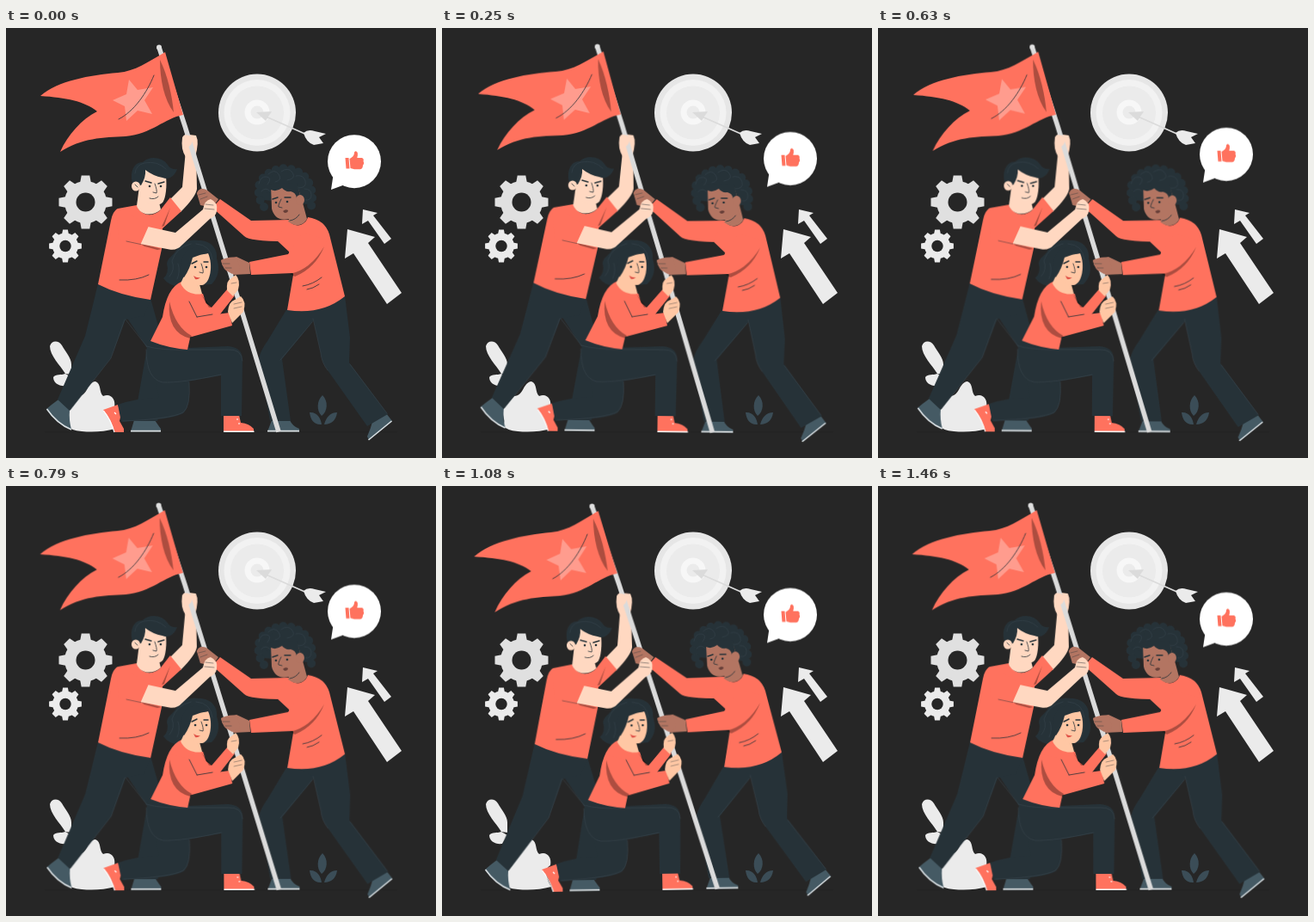
Animation of 500x500 px, one loop 1500 ms. Source, as an HTML page without scripts:

```html
<!DOCTYPE html>
<html lang="en">
<head>
<meta charset="utf-8">
<title>Raising the flag</title>
<style>
  html, body { margin: 0; width: 100%; height: 100%; overflow: hidden; background: #262626; }
  svg { display: block; width: 100vw; height: 100vh; }

  .coral { fill: #ff725e; }
  .dark { fill: #263238; }
  .pale { fill: #ebebeb; }
  .white { fill: #fff; }
  .peach { fill: #ffd8c1; }
  .tan { fill: #ffc7a4; }
  .brown { fill: #b37562; }
  .shoe { fill: #455a64; }
  .shade { fill: #000; opacity: .32; }
  .line, .seam, .curl { fill: none; stroke-linecap: round; stroke-linejoin: round; }
  .line { stroke: #263238; stroke-width: .8; }
  .brow { stroke-width: 1.4; }
  .seam { stroke: #3c4950; stroke-width: .5; }
  .curl { stroke: #36444c; stroke-width: .6; }

  /* both motions are linear, stepped at 24 pictures per second */
  .team { transform-origin: 246px 250px; animation: sway 1.5s -4ms infinite; }
  .bubble { animation: float 1.5s -4ms infinite; }

  @keyframes sway {
    0% { transform: rotate(0deg); animation-timing-function: steps(9); }
    25% { transform: rotate(1deg); animation-timing-function: steps(18); }
    75% { transform: rotate(-1deg); animation-timing-function: steps(9); }
    100% { transform: rotate(0deg); }
  }
  @keyframes float {
    0%, 100% { transform: translateY(0); animation-timing-function: steps(18); }
    50% { transform: translateY(-10px); animation-timing-function: steps(18); }
  }
</style>
</head>
<body>
<svg viewBox="0 0 500 500">
  <defs>
    <path id="tooth" d="M-6.500-22-4.800-31H4.800L6.500-22Z"/>
    <g id="teeth">
      <use href="#tooth"/>
      <use href="#tooth" transform="rotate(90)"/>
      <use href="#tooth" transform="rotate(180)"/>
      <use href="#tooth" transform="rotate(270)"/>
    </g>
    <g id="gear">
      <use href="#teeth"/>
      <use href="#teeth" transform="rotate(45)"/>
      <circle r="24.500"/>
      <circle r="11" fill="#262626"/>
    </g>
  </defs>

  <rect width="500" height="500" fill="#262626"/>
  <path d="M45 469.700H455" stroke="#232323" stroke-width=".7"/>

  <g id="scenery">
    <use href="#gear" x="92.500" y="202.500" fill="#e0e0e0"/>
    <use href="#gear" transform="translate(69 253.500) scale(.61)" fill="#ebebeb"/>

    <g id="board">
      <circle cx="292" cy="98.500" r="45" fill="#e6e6e6"/>
      <circle cx="292" cy="98.500" r="38.500" fill="#f2f2f2"/>
      <circle cx="292" cy="98.500" r="31" class="pale"/>
      <circle cx="292" cy="98" r="14.500" fill="#f7f7f7"/>
      <circle cx="292" cy="98" r="7.500" class="pale"/>
      <path d="M300 102 352 125" stroke="#dbdbdb" stroke-width="1.800"/>
      <path d="M291 98 309 97 302 108Z" fill="#dbdbdb"/>
      <path d="M346 122Q351 117 359 120L372 123 364 127 369 134 358 136Q349 133 346 122Z" class="pale"/>
    </g>

    <path class="pale" d="M397 234 429 243 421 250 460 308 443 321 404 262 394 268Z"/>
    <path class="pale" d="M415 211 432 215 427 218 448 245 440 251 421 224 414 228Z"/>

    <g class="pale">
      <path d="M51 370C53 363 61 363 65 369C69 376 76 384 76 391V403L69 402C63 392 51 381 51 370Z"/>
      <path d="M55 406C58 402 64 404 69 402L76 406 70 416C62 417 55 413 55 406Z"/>
      <path d="M71 462C75 455 68 450 72 441L84 428C95 428 94 412 104 411C111 413 108 424 113 428C122 424 128 432 126 441C118 446 121 456 127 466Q108 471 88 469Q75 468 71 462Z"/>
    </g>

    <g fill="#3b4d57">
      <path d="M368 427C375 434 374 446 367 451C361 445 361 434 368 427Z"/>
      <path d="M353 447C361 446 366 453 367 461C359 462 354 456 353 447ZM385 447C377 447 372 453 370 461C378 461 384 456 385 447Z"/>
    </g>
  </g>

  <g class="bubble">
    <path class="white" d="M381 168 378 188 397 181Z"/>
    <circle cx="405" cy="155.200" r="31" class="white"/>
    <path class="coral" d="M394.500 151H398.500L399.500 163.500H395.500ZM399.500 152C404 150 405 147 405 144.500Q407 142 408.800 145Q409.300 148 408.300 151H414Q416.500 152 415.500 155Q417 157.500 415 159.500Q415 163.500 412 164.300H405L400.500 163Z"/>
  </g>

  <g class="team">
    <g id="left-man">
      <path class="shoe" d="M149 456H173Q177 462 180 466V469.500H145Z"/>
      <path class="white" d="M145 467.700H180V469.500H145Z" opacity=".8"/>
      <path class="shoe" d="M61 432 74 444Q73 456 76 467Q59 460 47 443L53 438Z"/>
      <path d="M47.500 443Q59 460 76 467" fill="none" stroke="#dbe1e4" stroke-width="1.600"/>
      <path class="dark" d="M136 330 164 372 149 457 176 457 192 400 168 314Z"/>
      <path class="dark" d="M107 297 169 315 160 335 139 339 122 384 74 445 60 432 92 358 99 330Z"/>
      <path class="seam" d="M138 339 122 384 75 444M139 339 165 372"/>

      <path class="peach" d="M191 199 205 185 209 142 221 142 222 187Q221 196 203 214Z"/>
      <path class="peach" d="M205 128Q207 122 213 124L221 125Q225 133 220 149L209 150Q203 141 205 128Z"/>
      <path class="coral" d="M130 210 152 206C158 220 172 220 180 211L191 197 204 213 182 233 181 257 168 316Q132 311 107 298L122 224Q124 213 130 210Z"/>
      <path class="shade" d="M181 231 191 209 184 230ZM153 249 181 257 176 258 161 254Z"/>
      <path class="line" d="M132 293Q152 294 166 287"/>

      <path class="peach" d="M155 184 152 207C157 219 171 219 180 211L178 203Z"/>
      <path class="peach" d="M154 162 185 166C188 181 186 198 182 203C175 209 162 206 157 197Z"/>
      <path class="dark" d="M147 180C144 168 148 156 159 156C167 148 182 150 188 159Q191 165 199 164C196 173 189 177 182 174Q171 172 162 165Q163 173 157 183Z"/>
      <ellipse cx="151" cy="184" rx="5" ry="5.500" class="peach"/>
      <path class="curl" d="M150 169Q151 159 161 157Q176 154 186 164"/>
      <path class="line brow" d="M162 178 169 180M177 181 184 179"/>
      <path class="line" d="M173 181Q176 189 175 192L171 191M167 198Q173 200 177 196M150 182 153 185"/>
      <circle cx="167" cy="184" r="1.300" class="dark"/>
      <circle cx="180" cy="184" r="1.300" class="dark"/>
    </g>

    <g id="right-man">
      <path class="shoe" d="M309 456H330Q333 463 341 466V469.500H304Z"/>
      <path class="white" d="M304 467.700H341V469.500H304Z" opacity=".8"/>
      <path class="shoe" d="M442 448 449 457 422 479 420 475Q424 466 426 458Z"/>
      <path d="M448.500 457 421.500 479" stroke="#dbe1e4" stroke-width="1.600"/>
      <path class="dark" d="M327 326 359 334 357 341 321 385 331 457 307 457 294 384Q296 375 304 364Z"/>
      <path class="dark" d="M341 329 394 311 400 360 399 389 444 449 420 463 374 398Q367 389 366 378L357 338Z"/>
      <path class="seam" d="M357 338 366 378Q367 389 374 398M356 342 319 386M400 391 443 448"/>

      <path class="brown" d="M222 192Q225 185 233 188L247 199 240 209 226 206Z"/>
      <path class="coral" d="M330 223 285 224 249 199 240 209 277 242Q283 248 325 248Z"/>
      <path class="coral" d="M328 223C337 235 349 228 351 220Q371 223 376 240L394 312Q367 334 327 328L334 287 329 260 315 247Z"/>
      <path class="coral" d="M283 272 328 263 345 238 374 246 364 264Q349 284 333 285L285 287Z"/>
      <path class="shade" d="M330 286Q354 281 370 254Q360 279 336 289Z"/>
      <path class="line" d="M345 300Q357 298 367 290M350 304Q357 303 364 298"/>
      <path class="brown" d="M250 270 268 266 283 273 284 286 263 287Q251 281 250 270Z"/>

      <path class="dark" d="M300 200Q291 191 297 175Q309 159 329 163Q352 167 355 184Q360 200 351 205Z"/>
      <path d="M300 208Q291 196 295 180Q304 164 326 163Q348 167 353 182Q358 193 355 207L348 203" fill="none" stroke="#263238" stroke-width="10" stroke-linecap="round" stroke-dasharray="0 9"/>
      <path class="brown" d="M308 184 339 184 346 207 350 222C345 231 335 231 328 225L329 222C318 225 311 219 309 210Z"/>
      <path class="dark" d="M304 193Q302 183 312 180L339 181 343 199 338 198Q337 191 331 190Q325 191 321 186Q314 191 308 188Z"/>
      <ellipse cx="342" cy="200" rx="5" ry="6" class="brown"/>
      <path class="curl" d="M294 181q2-9 9-8t1 9M305 170q7-7 12 0t-4 9M320 167q8-6 13 1t-6 9M337 172q9-2 11 6t-8 8M297 190q5-6 10 0M347 187q8 0 8 7t-7 6"/>
      <path class="line brow" d="M310 199 316 197M324 197 331 197"/>
      <path class="line" d="M320 199Q316 207 317 208L321 209M330 224Q337 223 341 217"/>
      <path d="M322 213Q325 210 328 212Q328 215 324 215Z" fill="#673f38"/>
      <circle cx="314" cy="203" r="1.300" class="dark"/>
      <circle cx="327" cy="202" r="1.300" class="dark"/>
    </g>

    <g id="woman">
      <path class="coral" d="M113 444 130 438 134 448 132 457 137 466V470H126Q123 455 113 444Z"/>
      <path d="M113.500 445Q122 456 126 470" fill="none" stroke="#fff" stroke-width="1.200"/>
      <path class="dark" d="M172 400 213 411Q215 440 206 448C190 456 160 456 134 458L130 438Q152 430 178 430Z"/>
      <path class="coral" d="M253 450H271L273 459Q283 460 288 466V470H253Z"/>
      <path class="white" d="M253 468.600H288.500V470H253Z"/>
      <path d="M126 447 128 449M268 455 270 455M270 460 272 460" stroke="#fff" stroke-width="1.200"/>
      <path class="dark" d="M166 363 211 372 258 370Q275 371 275 386L274 451H250V404C225 408 195 416 180 411C165 405 159 383 166 363Z"/>
      <path class="seam" d="M163 374Q163 408 182 412Q204 413 250 403M213 412Q215 440 206 447Q190 455 136 457M163 370Q180 375 212 374H258Q274 373 275 387"/>

      <path class="dark" d="M183 291Q190 285 187 274C188 267 193 266 197 260C202 248 216 245 224 247C239 247 246 257 245 268Q251 286 239 298L211 300Q191 303 183 291Z"/>
      <path class="coral" d="M220 310 239 325 257 304 266 311 248 334 218 340Z"/>
      <path class="coral" d="M204 295Q216 310 229 309L236 331 215 356 211 374Q188 372 168 364L182 336Q187 302 204 295Z"/>
      <path class="tan" d="M209 284 203 297C208 308 220 311 228 309L225 298Z"/>
      <path class="tan" d="M211 265 235 262C241 275 238 297 228 299C215 300 209 290 208 282Z"/>
      <path class="dark" d="M204 288Q201 269 211 258Q224 252 235 262Q226 263 217 267Q214 280 207 290Z"/>
      <path class="curl" d="M190 289Q197 281 193 271Q198 255 215 251M199 292Q203 283 200 274M221 251Q238 252 240 269"/>
      <path class="coral" d="M193 312C184 335 191 352 205 358Q210 361 216 359L263 346 260 331 222 336 214 317Z"/>
      <path class="shade" d="M190 318Q187 354 214 361L216 358Q197 348 190 318ZM236 325 227 310 239 325Z"/>
      <path class="line" d="M222 336 213 318M222 336 240 333"/>
      <path class="line brow" d="M216 274 222 271M230 272 235 272"/>
      <path class="line" d="M227 274Q230 282 229 285L225 284"/>
      <path d="M218 288Q222 291 226 290Q223 293 220 292Z" fill="#e04f45"/>
      <circle cx="220" cy="278" r="1.300" class="dark"/>
      <circle cx="233" cy="278" r="1.300" class="dark"/>
    </g>

    <g id="pole">
      <path d="M178 22.500 208 114 258 276 317 469.500" fill="none" stroke="#dbdbdb" stroke-width="5.600"/>
      <circle cx="178" cy="22.500" r="3" fill="#e0e0e0"/>
      <path class="coral" d="M185 28C164 40 151 50 130 52C97 55 61 61 40 79C70 81 91 85 106 97C88 106 72 124 63 144C88 128 113 127 139 126C170 123 184 105 206 101Z"/>
      <path class="shade" d="M179 37C188 55 193 78 195 98C184 84 179 60 179 37Z"/>
      <path d="M143 60 153 72 171 69 161 84 170 100 153 96 140 108 138 91 124 84 140 77Z" fill="#ff9c8e"/>
      <path class="line" d="M172 55C164 75 149 97 131 106"/>
    </g>

    <g id="grips">
      <path class="peach" d="M205 128Q207 123 213 125L217 129Q217 136 211 139L206 138Z"/>
      <path class="brown" d="M222 192Q225 185 233 188L242 196 235 203 226 203Z"/>
      <path class="line" d="M224 194 232 192M226 199 234 196" opacity=".5"/>
      <path class="peach" d="M165 231 197 238 229 211Q231 200 238 199Q247 203 245 213Q244 219 237 222L205 252Q199 259 190 257.500L156 251Z"/>
      <path class="coral" d="M128 211Q139 207 147 218L166 230 156.500 251.500 131 246Z"/>
      <path class="line" d="M156.500 251.500 140 248M232 205 241 206M231 210 242 211" opacity=".6"/>
      <path class="brown" d="M250 270Q259 265 269 267L272 281 263 286Q252 281 250 270Z"/>
      <path class="line" d="M252 274 260 274M255 279 262 279" opacity=".5"/>
      <path class="tan" d="M257 305Q256 293 262 291L267 287Q273 293 270 304L264 312Z"/>
      <path class="tan" d="M258 330Q259 318 266 316L273 312Q280 318 276 330L263 343Z"/>
      <path class="line" d="M262 297 268 296M265 321 274 319M265 326 274 324" opacity=".5"/>
    </g>
  </g>
</svg>
</body>
</html>
```
